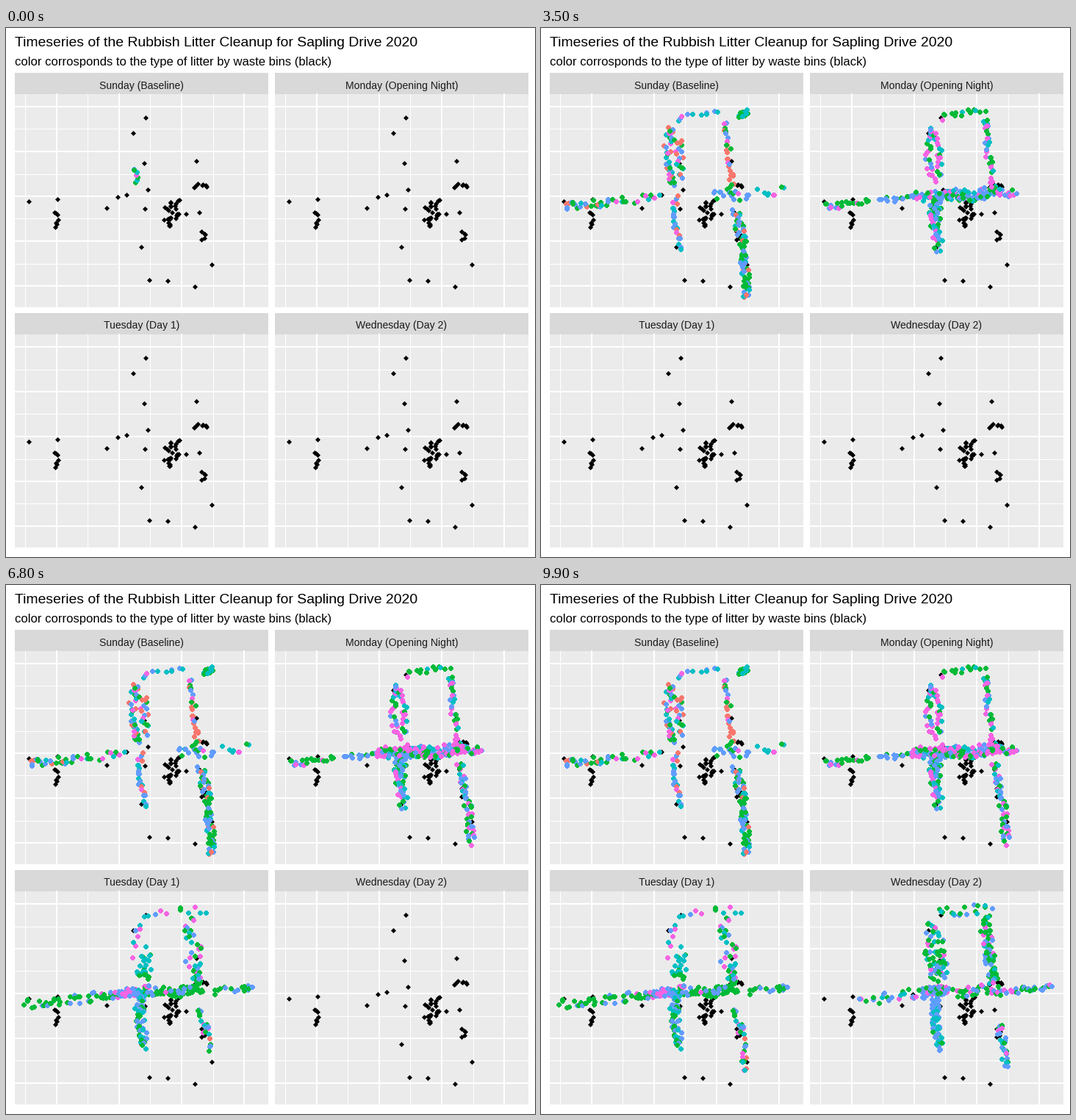
These frames come from a looping animation (720x720 px, 10 s). A matplotlib script:

```python
import numpy as np
import matplotlib.pyplot as plt
from matplotlib.animation import FuncAnimation
from matplotlib.patches import Rectangle

SIZE, FRAMES, STEP = 720, 100, 100
COL, ROW = 354, 327            # distance between neighbouring panels
FONT = "Liberation Sans"
HUES = dict(s="#F8766D", g="#00BA38", t="#00BFC4", b="#619CFF", p="#F564E3")
DAYS = ["Sunday (Baseline)", "Monday (Opening Night)",
        "Tuesday (Day 1)", "Wednesday (Day 2)"]
DAY_START = [0, 17, 43, 70]
DOT = dict(marker="D", s=24.5, lw=0, antialiased=False)
rng = np.random.default_rng(20)

# Streets in the coordinates of the first panel; every day uses the same ones.
STREETS = dict(
    west=[(28, 243), (90, 237), (160, 227)],
    mid=[(150, 230), (190, 225), (230, 228), (268, 221)],
    east=[(262, 228), (300, 224), (342, 219)],
    south=[(184, 228), (181, 258), (188, 302)],
    northwest=[(180, 212), (171, 178), (176, 135), (188, 160), (187, 205)],
    top=[(182, 128), (195, 118), (246, 114), (280, 117)],
    northeast=[(251, 125), (254, 170), (262, 218)],
    southeast=[(263, 245), (274, 290), (280, 368)],
)

fig = plt.figure(figsize=(SIZE / 72, SIZE / 72), dpi=72, facecolor="white")
ax = fig.add_axes([0, 0, 1, 1])
ax.set(xlim=(0, SIZE), ylim=(SIZE, 0))
ax.axis("off")


def along(path, n, spread, part=(0, 1)):
    """n jittered points on a stretch of a path, in walking order."""
    path = np.array(path, float)
    dist = np.r_[0, np.cumsum(np.hypot(*np.diff(path, axis=0).T))]
    u = part[0] + (np.arange(n) + rng.random(n)) / n * (part[1] - part[0])
    pts = np.c_[[np.interp(u * dist[-1], dist, c) for c in path.T]].T
    r, a = spread * np.sqrt(rng.random(n)), rng.uniform(0, 2 * np.pi, n)
    return np.round(pts + np.c_[r * np.cos(a), r * np.sin(a)]) + 0.5


def shift(day):
    return np.array([day % 2 * COL, day // 2 * ROW])


def box(x, y, w, h, color):
    ax.add_patch(Rectangle((x, y), w, h, fc=color, lw=0, antialiased=False, zorder=0))


def label(x, y, text, size, color="black", ha="left"):
    ax.text(x, y, text, fontsize=size, color=color, family=FONT, ha=ha, va="baseline")


def grid(xs, ys, lw):
    ax.plot(xs, ys, color="white", lw=lw, antialiased=False, zorder=1)


lone_bins = np.array([
    (189, 121), (172, 142), (187, 183), (258, 180), (192, 219), (163, 226),
    (151, 229), (136, 244), (188, 245), (30, 235), (69, 232), (183, 297),
    (194, 342), (219, 343), (256, 351), (279, 321), (262, 250), (244, 252),
]) + 0.5
bins = np.vstack([
    lone_bins,
    along([(62, 249), (69, 255), (66, 273)], 7, 2),
    along([(264, 273), (273, 283), (264, 288)], 5, 1),
    along([(253, 217), (258, 211), (275, 214)], 8, 2),
    along([(238, 235), (217, 241), (234, 252), (215, 262), (226, 268)], 27, 4),
])


def panel(day):
    x, y = shift(day) + (12, 61)
    box(x, y, 345, 29, "#D9D9D9")
    box(x, y + 29, 345, 290, "#EBEBEB")
    for i in range(8):
        gx = round(x + 13 + 42.6 * i) + 0.5
        grid([gx, gx], [y + 29, y + 319], 1 + i % 2)
    for i in range(9):
        gy = round(y + 45 + 30.5 * i) + 0.5
        grid([x, x + 345], [gy, gy], 2 - i % 2)
    label(x + 172.5, y + 21.5, DAYS[day], 14, "#1A1A1A", "center")
    ax.scatter(*(bins + shift(day)).T, c="black", zorder=2, **DOT)


label(12, 25, "Timeseries of the Rubbish Litter Cleanup for Sapling Drive 2020", 19.35)
label(12.5, 51, "color corrosponds to the type of litter by waste bins (black)", 16.65)
for day in range(4):
    panel(day)

births, places, colors = [], [], []


def walk(street, first, last, hues, rate=13, spread=6, part=(0, 1)):
    """Pick up `rate` pieces per frame along a street; hue letters are weights."""
    frames = np.arange(first, last + 1)
    n = rate * len(frames)
    day = np.searchsorted(DAY_START, first, side="right") - 1
    births.extend(np.repeat(frames, rate))
    places.extend(along(STREETS[street], n, spread, part) + shift(day))
    colors.extend(HUES[h] for h in rng.choice(list(hues), n))


# Sunday
walk("northwest", 0, 0, "gggbtp", 8, 4, (0, 0.15))
walk("south", 1, 2, "sbbbtp", spread=4)
walk("west", 3, 4, "ggbbbts", part=(0, 0.5))
walk("west", 4, 5, "gpgbt", 7, part=(0.5, 1))
walk("northwest", 5, 7, "gtbps", 17)
walk("top", 7, 8, "bbtp", 5, 2, (0, 0.66))
walk("top", 8, 8, "ggt", 18, part=(0.9, 1))
walk("northeast", 9, 10, "sspbg", spread=5)
walk("mid", 11, 11, "bbtg", part=(0.7, 1))
walk("east", 11, 12, "bbtgp", 7, 7, (0, 0.9))
walk("southeast", 12, 16, "ggtbbbs", 15)

# Monday
walk("south", 17, 19, "ggtbb", 12, 9, (0, 0.5))
walk("mid", 19, 21, "bbbpgt", 18, 8, (0.4, 1))
walk("east", 21, 22, "bbgp", 7, part=(0, 0.4))
walk("south", 23, 24, "bbtgp", 17, 8, (0.2, 1))
walk("mid", 25, 27, "ggbbpt", 16, 8)
walk("northwest", 27, 30, "ppbtg", 11, 4)
walk("top", 30, 31, "ggpt", 7, 4, (0.1, 0.7))
walk("northeast", 31, 31, "tbg", 10, 5, (0, 0.1))
walk("northeast", 31, 33, "ppgbt", 9, 5)
walk("west", 34, 34, "gggpb", 20, 5, (0, 0.5))
walk("west", 35, 35, "gpb", 16, 5, (0.6, 1))
walk("mid", 36, 39, "ppppgb", 15, 9)
walk("east", 39, 39, "gp", 4, part=(0.2, 0.45))
walk("southeast", 40, 43, "bbggtp", part=(0, 0.85))

# Tuesday
walk("west", 43, 44, "pg", 2, part=(0.75, 0.95))
walk("southeast", 44, 44, "p", 4, part=(0.2, 0.35))
walk("mid", 44, 45, "pppbg", 12, part=(0, 0.4))
walk("mid", 45, 48, "gggggb", 10, 7, (0.4, 0.95))
walk("northeast", 48, 49, "ggtp", 9, part=(0.7, 1))
walk("east", 50, 50, "bbs", 5, part=(0.78, 0.92))
walk("west", 51, 53, "gggb", 16, 7)
walk("mid", 54, 56, "gbbtp", 9, 8, (0, 0.4))
walk("northwest", 56, 57, "gggtt", 12, 11, (0.85, 1))
walk("northwest", 58, 59, "tbp", 4, part=(0.2, 0.75))
walk("top", 59, 60, "gtpb", 5, 5)
walk("northeast", 60, 62, "bbpgt", 9, 13, (0, 0.8))
walk("mid", 62, 63, "ggbp", 9, part=(0.6, 1))
walk("east", 63, 64, "ggb", 7, 5, (0.2, 0.95))
walk("south", 64, 67, "ggbbt", 13, 7)
walk("southeast", 67, 69, "ggbtps", 9, 5, (0, 0.75))

# Wednesday
walk("mid", 70, 70, "sgp", 5, part=(0.55, 0.75))
walk("mid", 71, 72, "bbbp", 13, 8, (0.1, 0.35))
walk("south", 73, 76, "tttbbg", 14, part=(0.1, 1))
walk("west", 76, 79, "gtbbp", 5, 10, (0.4, 1))
walk("mid", 80, 81, "bbbp", 10, 7, (0.05, 0.4))
walk("northwest", 82, 83, "ggptb", 17, 12, (0.85, 1))
walk("northwest", 83, 85, "ggbtp", 14, 7, (0, 0.85))
walk("top", 85, 86, "gggbt", 9, 8, (0.1, 0.75))
walk("northeast", 86, 87, "ggpb", 7, 8, (0, 0.5))
walk("southeast", 87, 88, "bbtgp", 14, part=(0.2, 0.7))
walk("northeast", 89, 93, "ggggbpt", 12, 8)
walk("mid", 94, 96, "ggpbb", 14, 9, (0.1, 1))
walk("east", 97, 99, "pgbb", 11, 4)

order = np.argsort(births, kind="stable")
births = np.array(births)[order]
places = np.array(places)[order]
colors = np.array(colors)[order]
litter = ax.scatter([], [], zorder=3, **DOT)


def draw(frame):
    n = np.searchsorted(births, frame, side="right")
    litter.set_offsets(places[:n])
    litter.set_facecolor(colors[:n])
    return litter,


anim = FuncAnimation(fig, draw, frames=FRAMES, interval=STEP, repeat=True, repeat_delay=0)
plt.show()
```
